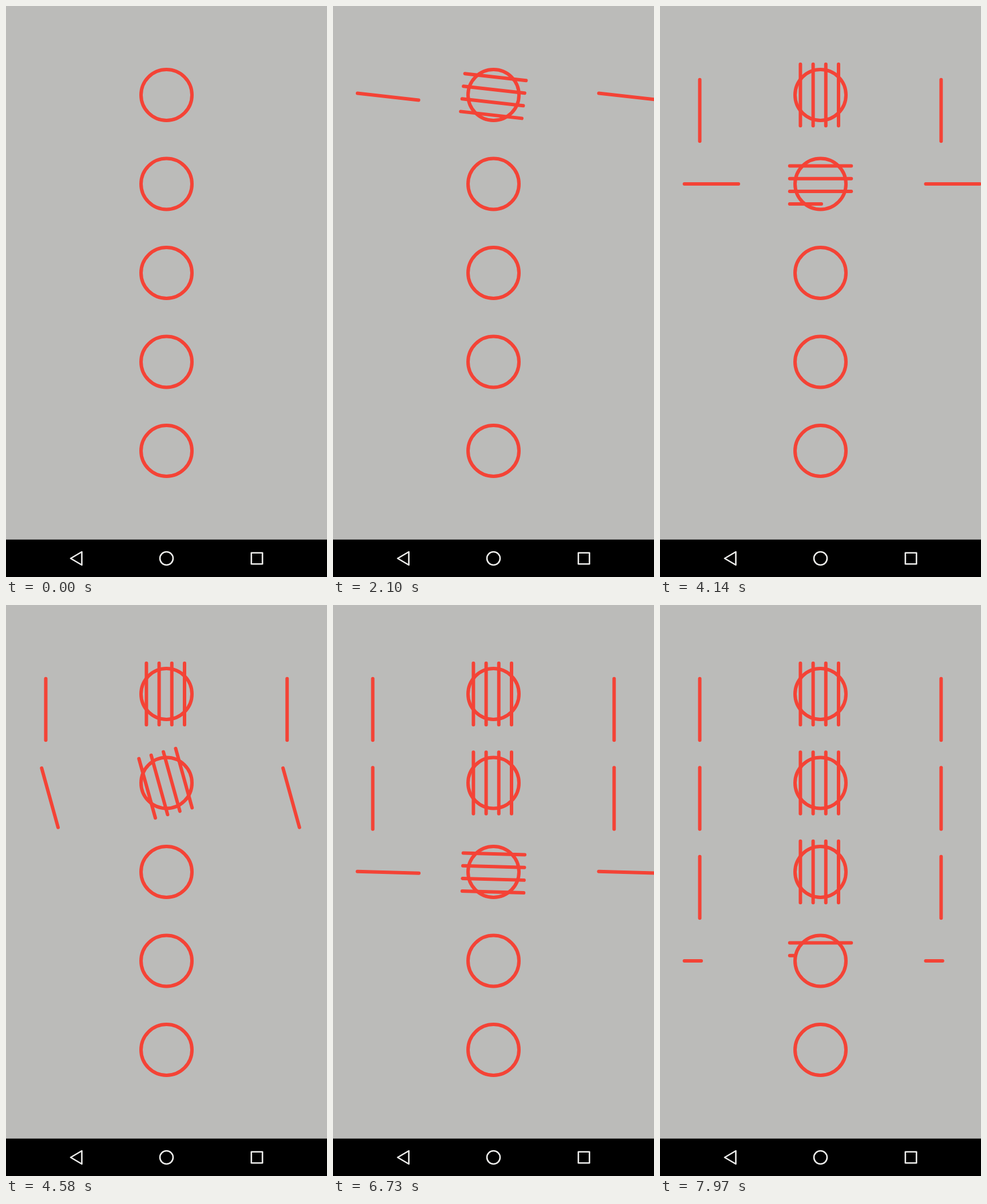
Animation, 561 px wide and 998 px high, one loop 8 s. Source, as an HTML page with a canvas:

```html
<!DOCTYPE html>
<html lang="en">
<head>
<meta charset="utf-8">
<title>Lines and rings</title>
<style>
  html, body { margin: 0; width: 100%; height: 100%; overflow: hidden; background: #bbbbb9; }
  canvas { display: block; }
</style>
</head>
<body>
<canvas width="561" height="998"></canvas>
<script>
const ctx = document.querySelector('canvas').getContext('2d');
const LOOP = 8000, STEP = 8000 / 180;
const GROW = 1400, TURN = 410;
const LENGTH = 107.5, GAP = 22.2, CENTER = 280.5;

// Times in ms: lines grow, lines turn, turning holds, lines snap upright
const rows = [
  { grow: 588, turn: 2031, hold: 2370, snap: 2857 },
  { grow: 2916, turn: 4292, hold: 4620, snap: 5207 },
  { grow: 5253, turn: 6689, hold: 7040, snap: 7537 },
  { grow: 7585, turn: 9021, hold: 9370, snap: 9870 },
  { grow: 9918, turn: 11350, hold: 11700, snap: 12200 }
];

const clamp = v => Math.min(1, Math.max(0, v));
const ease = v => (1 - Math.cos(Math.PI * v)) / 2;

function line(x, y, part) {
  if (part <= 0) return;
  ctx.beginPath();
  ctx.moveTo(x, y);
  ctx.lineTo(x + LENGTH * clamp(part), y);
  ctx.stroke();
}

function ring(x, y, r) {
  ctx.beginPath();
  ctx.arc(x, y, r, 0, 2 * Math.PI);
  ctx.stroke();
}

function turned(x, y, angle, paint) {
  ctx.save();
  ctx.translate(x, y);
  ctx.rotate(angle);
  paint();
  ctx.restore();
}

function drawRow(row, y, time, tick) {
  ring(CENTER, y, 44.5);
  const part = clamp((tick - row.grow) / GROW);
  const turn = time >= row.snap ? 1 : ease(clamp((Math.min(tick, row.hold) - row.turn) / TURN));
  const angle = turn * Math.PI / 2;
  for (const x of [69.5, 491.3])
    turned(x, y, angle, () => line(-LENGTH / 4, 0, part));
  turned(CENTER, y, angle, () => {
    for (let i = 0; i < 4; i++) line(-LENGTH / 2, -31.5 + GAP * i, part * 4 - i);
  });
}

function drawNav() {
  ctx.fillStyle = '#000';
  ctx.fillRect(0, 932.6, 561, 66);
  ctx.strokeStyle = '#eeeeec';
  ctx.lineWidth = 2.6;
  ctx.lineJoin = 'round';
  ctx.beginPath();
  ctx.moveTo(113, 965.5);
  ctx.lineTo(132.5, 954);
  ctx.lineTo(132.5, 977);
  ctx.closePath();
  ctx.stroke();
  ring(280.5, 965.5, 11.5);
  ctx.strokeRect(428.8, 955.8, 19.4, 19.4);
}

function draw(now) {
  const time = now % LOOP;
  const tick = Math.floor((time - 45) / STEP) * STEP + 57; // about 22 pictures a second
  ctx.fillStyle = '#bbbbb9';
  ctx.fillRect(0, 0, 561, 998);
  ctx.strokeStyle = '#f44336';
  ctx.lineWidth = 6;
  ctx.lineCap = 'round';
  rows.forEach((row, i) => drawRow(row, 155.5 + 155.5 * i, time, tick));
  drawNav();
}

const start = performance.now();
function loop() {
  draw(performance.now() - start);
  requestAnimationFrame(loop);
}
loop();
</script>
</body>
</html>
```
